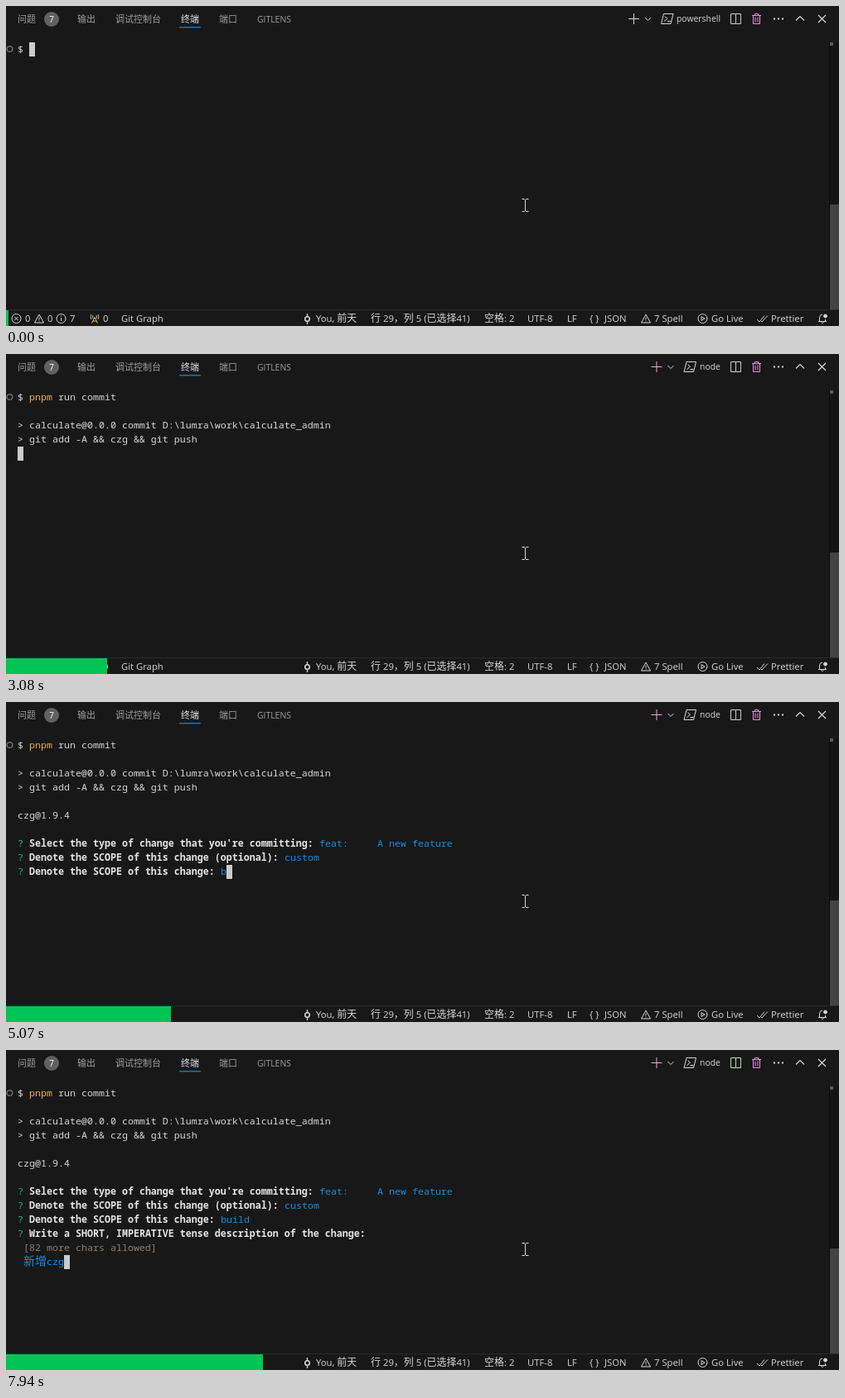
Write an HTML page that moves like this. It is 1005x387 px and loops after 8 s.

```html
<!DOCTYPE html>
<html lang="zh">
<head>
<meta charset="utf-8">
<title>Terminal commit prompt</title>
<style>
  html, body { margin: 0; height: 100%; overflow: hidden; background: #181818; }
  svg { display: block; }
  text { font: 11.3px "Open Sans", "Noto Sans CJK SC", "Noto Sans CJK", sans-serif; fill: #d6d6d6; white-space: pre; }
  tspan { font-size: 1.06em; }
  .tab text { font-size: 10.4px; }
  .ime text { font-size: 13.2px; fill: #eee; }
  .icon { fill: none; stroke: #d6d6d6; }
  #term text { font: 500 11.667px "Noto Sans Mono", "DejaVu Sans Mono", "Noto Sans CJK SC", monospace; }
  #term .y { fill: #e8b04e; }
  #term .g { fill: #0dbc79; }
  #term .b { fill: #e5e5e5; font-weight: 700; }
  #term .d { fill: #808080; }
  #term .n { fill: #8a7d72; }
  #term .h { fill: #148ee0; }
  #term .z { fill: #148ee0; font-size: 14px; font-weight: 400; }
  #term .c { fill: #fff; font-weight: 700; }
</style>
</head>
<body>
<svg width="1005" height="387" viewBox="0 0 1005 387">
  <rect width="1005" height="387" fill="#181818"/>

  <g id="tabs" class="tab"></g>
  <rect x="209" y="25" width="26" height="1.5" fill="#0078d4"/>

  <g class="icon">
    <g id="launcher">
      <path id="plus" d="M751 15.5h13M757.5 9v13"/>
      <path d="M771 14l3.5 3.5L778 14"/>
      <path d="M793.5 9.5h11.5l-3 12h-11.5zM795 12.5l3 3-4 3M798 18.5h4"/>
    </g>
    <path stroke="#c4d4c0" d="M874.5 9.5h12v12h-12zM880.5 9.5v12"/>
    <path stroke="#f08cec" d="M900 11.5h11M903.5 11v-1.5h4v1.5M901.5 12v9.5h8v-9.5M904 13.5v6M907 13.5v6"/>
    <path stroke-width="2" d="M926 15.5h2M931 15.5h2M936 15.5h2"/>
    <path stroke-width="1.2" d="M953 17.5l5-5 5 5M980 11l9 9M989 11l-9 9"/>
  </g>

  <circle cx="4.5" cy="52" r="3.3" fill="none" stroke="#6b6b6b" stroke-width="1.5"/>
  <path d="M994 44h11v323h-11z" fill="#141414"/>
  <path d="M993.5 44v323" stroke="#0c0c0c"/>
  <path d="M994 44h4v4h-4z" fill="#5a5a5a"/>
  <path d="M994 240h11v127h-11z" fill="#434343"/>

  <g id="term"></g>
  <g id="ime" class="ime"></g>
  <path d="M622.5 233.5h3l1 1 1-1h3M626.5 234v14M622.5 248.5h3l1-1 1 1h3" fill="none" stroke="#ddd"/>

  <path d="M0 367.5h1005" stroke="#2b2b2b"/>
  <g id="status"></g>
  <g class="icon">
    <circle cx="12.5" cy="378" r="5.5"/><path d="M10.5 376l4 4M14.5 376l-4 4"/>
    <path id="warn" d="M40 373l5.5 10h-11zM40 376.5v3M40 380.5v1"/>
    <use href="#warn" x="732"/>
    <circle cx="66.5" cy="378" r="5.5"/><path d="M66.5 377v4M66.5 374.5v1"/>
    <path stroke="#d8b48c" d="M103.5 383.5l3.5-7 3.5 7M105 381h4M103 373q-2 3 0 6M111 373q2 3 0 6M105 374q-1 2 0 4M109 374q1 2 0 4"/>
    <path stroke-width="1.3" d="M363.5 372v4M363.5 381v4"/>
    <circle cx="363.5" cy="378.5" r="2.8" stroke-width="1.5"/>
    <circle cx="840.5" cy="378" r="5.5"/><path d="M839 375.5l4 2.5-4 2.5z"/>
    <path d="M906 379l3 3 6-7.5M911 381l1 1 7-7.5"/>
    <path d="M980 381.5h10M981.5 381v-4q0-4 3.5-4M988.5 379v2M983.5 382.5q1.5 2 3 0"/>
    <circle cx="988.5" cy="375" r="2" fill="#d6d6d6"/>
  </g>
  <rect id="progress" y="368" height="19" fill="#00c455"/>
</svg>

<script>
const LOOP = 8000, STEPS = 117, CELL = 7, ROW = 17, LEFT = 14, TOP = 44;
const $ = id => document.getElementById(id);
const escape = s => String(s).replace(/&/g, '&amp;').replace(/</g, '&lt;');
const widenCjk = s => s.replace(/[\u2e80-\uffef]+/g, '<tspan>$&</tspan>');
const label = (x, y, s, fill = '#d6d6d6') =>
  `<text x="${x}" y="${y}" style="fill:${fill}">${widenCjk(escape(s))}</text>`;
const rect = (x, y, w, h, fill, r = 0, stroke = 'none') =>
  `<rect x="${x}" y="${y}" width="${w}" height="${h}" rx="${r}" fill="${fill}" stroke="${stroke}"/>`;

const tabs = [[14, '问题'], [86, '输出'], [132, '调试控制台'], [211, '终端'], [257, '端口'], [303, 'GITLENS']];
$('tabs').innerHTML = tabs.map(([x, s]) => label(x, 20, s, s === '终端' ? '#e7e7e7' : '#9d9d9d')).join('')
  + '<circle cx="55" cy="16" r="9" fill="#616161"/>' + label(52, 20, '7', '#f8f8f8')
  + '<text id="shell" y="19"></text>';

const status = [[23, '0'], [50, '0'], [77, '7'], [117, '0'], [139, 'Git Graph'], [374, 'You, 前天'],
  [440, '行 29，列 5 (已选择41)'], [577, '空格: 2'], [629, 'UTF-8'], [677, 'LF'], [704, '{ }'],
  [722, 'JSON'], [782, '7 Spell'], [851, 'Go Live'], [923, 'Prettier']];
$('status').innerHTML = status.map(([x, s]) => label(x, 382, s)).join('');

const types = ['feat:     A new feature', 'fix:      A bug fix', 'docs:     Documentation only changes',
  'style:    Changes that do not affect the meaning of the code',
  'refactor: A code change that neither fixes a bug nor adds a feature',
  'perf:     A code change that improves performance',
  'test:     Adding missing tests or correcting existing tests'];

// "~k" starts a run of style k; "~_" is the block cursor.
const HINT = '~dUse arrow keys or type to search~_';
const ask = question => `~g? ~b${question} `;
const menu = (items, active) => items.map((s, i) => i === active ? `~h❯~h ${s}` : `~w  ${s}`);
const typed = (t, text, start, gap) => text.slice(0, Math.max(0, Math.floor((t - start) / gap) + 1));

const IME_OPEN = 6680, IME_CLOSE = 7650;
const composing = t => t < 6900 ? 'c' : t < 7240 ? "c'z" : "c'z'g";

function description(t) {
  if (t < 6300) return '~_';
  if (t < 6530) return t < 6420 ? '~cx' : "~cx'z";
  if (t < IME_OPEN) return '~z新增~_';
  return t < IME_CLOSE ? `~z新增~c${composing(t)}` : '~z新增~hczg~_';
}

function screen(t) {
  const cmd = typed(t, 'pnpm ', 330, 115) + typed(t, 'run ', 950, 180) + typed(t, 'commit', 1730, 110);
  const lines = [`~w$ ~y${cmd.slice(0, 4)}~w${cmd.slice(4)}`];
  if (t < 2550) return [lines[0] + '~_'];
  if (t < 2950) return [...lines, '~_'];
  lines.push('', '~w> calculate@0.0.0 commit D:\\lumra\\work\\calculate_admin', '~w> git add -A && czg && git push');
  if (t < 3220) return [...lines, '~_'];
  lines.push('', '~wczg@1.9.4', '');
  if (t < 3380) return [...lines, '~_'];

  const type = ask("Select the type of change that you're committing:");
  if (t < 3900) return [...lines, type + HINT, ...menu(types, 0), '~d(Move up and down to reveal more choices)'];
  lines.push(type + '~h' + types[0]);

  const scope = ask('Denote the SCOPE of this change (optional):');
  if (t < 4550) return [...lines, scope + HINT, ...menu(['empty', 'custom'], t < 4260 ? 0 : 1)];
  lines.push(scope + '~hcustom');

  const name = ask('Denote the SCOPE of this change:') + '~h' + typed(t, 'build', 4990, 140);
  if (t < 5900) return [...lines, name + '~_'];
  const left = t < 6530 ? 87 : t < IME_CLOSE ? 85 : 82;
  return [...lines, name, ask('Write a SHORT, IMPERATIVE tense description of the change:'),
    `~n [${left} more chars allowed]`, '~w ' + description(t)];
}

function drawLine(line, row) {
  const parts = line.split(/~(.)/), y = TOP + row * ROW;
  let col = 0, out = '';
  for (let i = 1; i < parts.length; i += 2) {
    const kind = parts[i], s = parts[i + 1], x = LEFT + col * CELL;
    if (kind === '_') out += rect(x, y, CELL, ROW, '#ccc');
    if (kind === 'c') out += rect(x, y, s.length * CELL + 2, ROW, '#000');
    if (s) out += `<text class="${kind}" x="${x}" y="${y + 12}">${escape(s).replace(/ /g, '\u00a0')}</text>`;
    col += s.length * (kind === 'z' ? 2 : 1);
  }
  return out;
}

const candidates = {
  "c": '从 才 出 吃 成 次 错',
  "c'z": '承载 操作 材质 承重 ⊥ 垂直 存在',
  "c'z'g": '操作过 操作感 操作工 创作歌 财政官 操作 成长过'
};

function drawIme(t) {
  if (t < IME_OPEN || t >= IME_CLOSE) return '';
  const words = candidates[composing(t)].split(' ');
  const pitch = s => 38 + 14 * Math.max(2, s.length);
  let x = 67, items = '';
  words.forEach((s, i) => {
    items += label(x, 286, i + 1) + label(x + 13, 286, s);
    x += pitch(s);
  });
  const end = x - 11;
  return rect(52.5, 264.5, end + 58, 33, '#2b2b2b', 6, '#3a3a3a')
    + rect(59, 268, pitch(words[0]) - 7, 26, '#383838', 4) + rect(56, 273, 3, 16, '#4a9fd8', 1.5) + items
    + `<g class="icon" transform="translate(${end} 0)">
      <path stroke="#3d3d3d" d="M.5 265v32M53.5 265v32M82.5 265v32"/>
      <path fill="#777" stroke="none" d="M18 277v8l-6-4z"/>
      <path fill="#fff" stroke="none" d="M36 276.5v9l6-4.5z"/>
      <path stroke="#eee" d="M68 274.5h-5q-2 0-2 2v9q0 2 2 2h9q2 0 2-2v-4"/>
      <path fill="#eee" stroke="none" d="M71 281l-4-4q-1-3 2-3.5l2 1.5 2-1.5q3 .5 2 3.5z"/>
      <path stroke="#eee" stroke-width="1.3" d="M91 278.500l6 6 6-6"/></g>`;
}

function draw(step) {
  const t = step * LOOP / STEPS, node = t >= 2950;
  $('term').innerHTML = screen(t).map(drawLine).join('');
  $('ime').innerHTML = drawIme(t);
  $('progress').setAttribute('width', Math.round(3 + step * 307 / 116));
  $('launcher').setAttribute('transform', `translate(${node ? 27.5 : 0} 0)`);
  $('plus').setAttribute('stroke', node ? '#e8a8e2' : '#e0d8c4');
  $('shell').setAttribute('x', node ? 837 : 809);
  $('shell').textContent = node ? 'node' : 'powershell';
}

const start = performance.now();
let shown = -1;
function tick() {
  const t = (performance.now() - start) % LOOP;
  const step = Math.min(STEPS - 1, Math.floor((t + 10) * STEPS / LOOP));
  if (step !== shown) draw(shown = step);
  requestAnimationFrame(tick);
}
tick();
</script>
</body>
</html>
```
